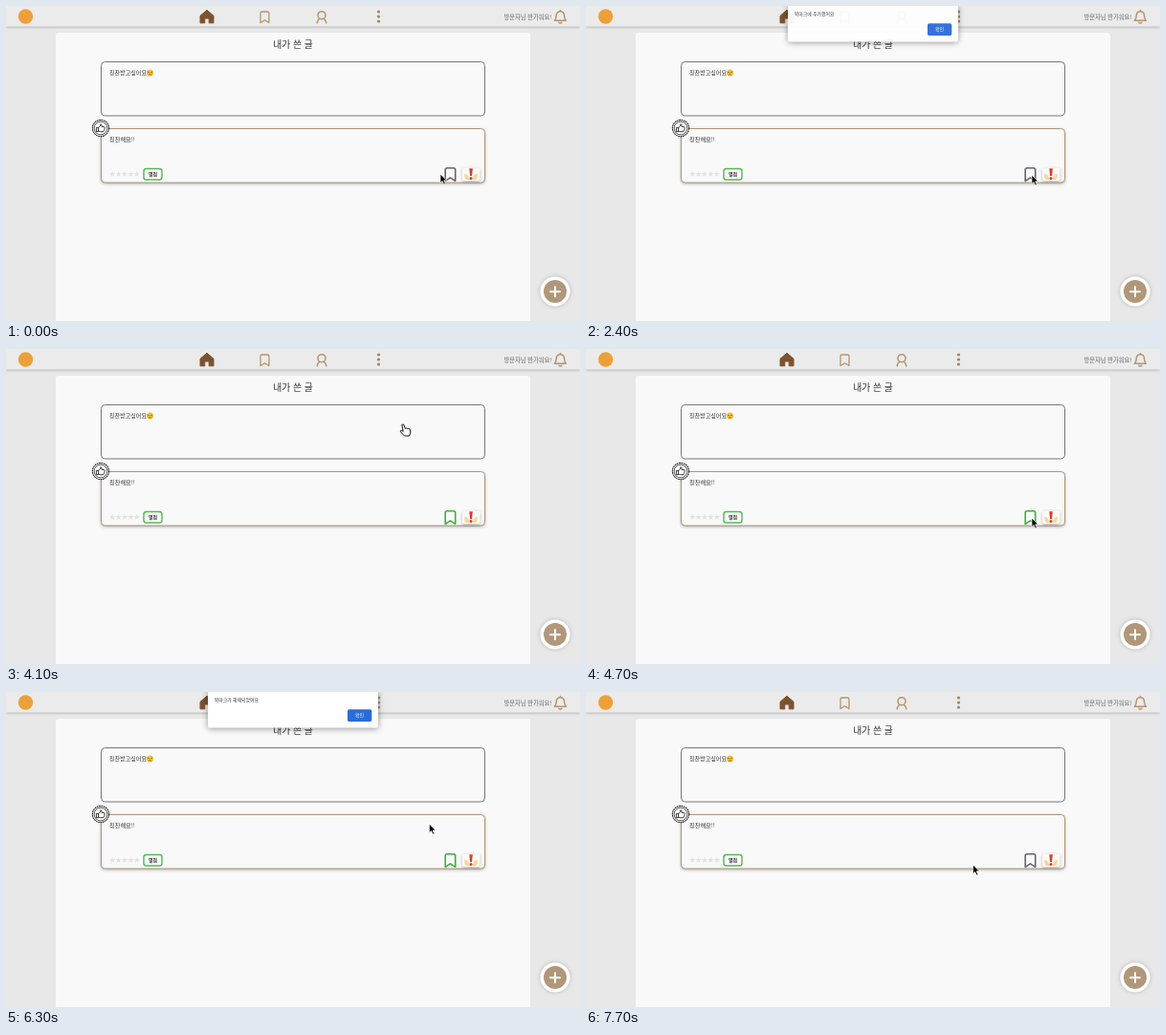
Animation, 600 px wide and 330 px high, one loop 7.8 s. Source, as an HTML page:

```html
<!DOCTYPE html>
<html lang="ko">
<head>
<meta charset="utf-8">
<style>
html, body { margin: 0; width: 100%; height: 100%; overflow: hidden; background: #e8e8e8; }
svg { display: block; width: 600px; height: 330px; }
text { font-family: "Noto Sans CJK KR", "Noto Sans CJK", "Noto Sans CJK JP", sans-serif; fill: #333; }
.line { fill: none; stroke-linecap: round; stroke-linejoin: round; }
.soft { filter: drop-shadow(0 1px 1.5px rgba(0,0,0,.28)); }
</style>
</head>
<body>
<svg viewBox="0 0 600 330">
  <defs>
    <path id="star" d="M0-3.2L.9-1 3.1-.9 1.4.5 2 2.7 0 1.5-2 2.7-1.4.5-3.1-.9-.9-1Z" fill="#e2e2e2"/>
    <path id="ribbon" d="M1.8 0H8.7Q10.5 0 10.5 1.8V13.6L5.25 10.2 0 13.6V1.8Q0 0 1.8 0Z"/>
  </defs>

  <rect width="600" height="330" fill="#e8e8e8"/>
  <rect x="52" y="28" width="496" height="310" rx="3" fill="#f9f9f9"/>

  <!-- Header -->
  <rect width="600" height="21.5" fill="#ebebeb" style="filter:drop-shadow(0 1px 1px rgba(0,0,0,.22))"/>
  <circle cx="20.5" cy="11" r="7.7" fill="#eda03a"/>
  <path d="M210 4.2L217 10.3V17.8H212.2V13H207.8V17.8H203V10.3Z" fill="#7c522f" stroke="#7c522f" stroke-linejoin="round"/>
  <g class="line" stroke="#b2956f" stroke-width="1.5">
    <use href="#ribbon" transform="translate(266 6) scale(.85)"/>
    <circle cx="330" cy="9.7" r="4"/>
    <path d="M325.2 17.8Q325.7 14.2 328 13.4M334.8 17.8Q334.3 14.2 332 13.4"/>
    <path d="M573.4 15.2H585.4Q583.6 13.3 583.6 10.5 583.6 6.2 579.4 5.5 575.2 6.2 575.2 10.5 575.2 13.3 573.4 15.2ZM579.4 5.4V4.4M577.9 17.4Q579.4 18.6 580.9 17.4"/>
  </g>
  <g fill="#a5825c">
    <circle cx="389.5" cy="6" r="1.6"/><circle cx="389.5" cy="11" r="1.6"/><circle cx="389.5" cy="16" r="1.6"/>
  </g>
  <text x="520.5" y="13.7" font-size="6.25" style="fill:#666">방문자님 반가워요!</text>

  <text x="300" y="44" font-size="9.8" text-anchor="middle">내가 쓴 글</text>

  <!-- First card -->
  <rect x="99.5" y="58.5" width="401" height="56.5" rx="4" fill="#f9f9f9" stroke="#77757a"/>
  <text x="108" y="72.3" font-size="6.05">칭찬받고싶어요</text>
  <circle cx="150.5" cy="70" r="3.6" fill="#f5bf3d"/>
  <path class="line" d="M148.4 69.2L149.6 69.6M151.4 69.6L152.6 69.2M149.3 72Q150.5 70.9 151.7 72" stroke="#7a4a1c" stroke-width=".7"/>

  <!-- Second card -->
  <rect class="soft" x="99.5" y="128.5" width="401" height="56.5" rx="4" fill="#f9f9f9" stroke="#ae9479"/>
  <text x="108" y="142.3" font-size="6.2">칭찬해요!!</text>
  <g id="stars"></g>
  <rect x="144" y="170.5" width="19" height="11.5" rx="2.6" fill="#fff" stroke="#4fba50" stroke-width="1.4"/>
  <text x="153.5" y="178" font-size="5" font-weight="700" text-anchor="middle">별점</text>
  <circle cx="99" cy="128" r="9" fill="#fff"/>
  <circle cx="99" cy="128" r="8.6" fill="none" stroke="#222" stroke-width="1.1" stroke-dasharray="1.8 .6"/>
  <circle cx="99" cy="128" r="6.9" fill="#fff" stroke="#222" stroke-width=".8"/>
  <path class="line" d="M94.8 127.4H96.6V131.6H94.8ZM96.6 127.6L98.5 125.8 98.9 123.7Q100.4 123.6 100.2 126.5H102.5Q103.6 126.8 103 128.2 103.3 129.3 102.5 130.2 102.3 131.6 101.2 131.7H98.3L96.6 131.1" stroke="#222" stroke-width=".9"/>
  <use id="mark" href="#ribbon" class="line" x="459.2" y="169.7" stroke-width="1.6"/>
  <rect class="soft" x="477" y="169.5" width="18.5" height="13.6" rx="2" fill="#fafafa"/>
  <path d="M479.2 176Q481.5 174.8 483.4 178.5L484.3 182H480.6Q478.6 179 479.2 176ZM492.8 176Q490.5 174.8 488.6 178.5L487.7 182H491.4Q493.4 179 492.8 176Z" fill="#f7d79a"/>
  <path d="M484.3 170.3H487.8L487 178H485.1Z" fill="#dc3b27"/>
  <circle cx="486" cy="180.6" r="1.5" fill="#dc3b27"/>

  <!-- Add button -->
  <circle cx="574" cy="299" r="15.6" fill="#fff" style="filter:drop-shadow(0 0 2px rgba(0,0,0,.22))"/>
  <circle cx="574" cy="299" r="12" fill="#b1977a"/>
  <path class="line" d="M569 299.3H579M574 294.3V304.3" stroke="#fff" stroke-width="2"/>

  <g id="dialog">
    <path d="M211 -2H389V35.5Q389 37.5 387 37.5H213Q211 37.5 211 35.5Z" fill="#fff" style="filter:drop-shadow(0 1px 3px rgba(0,0,0,.4))"/>
    <text id="message" x="217.7" y="9.8" font-size="4.88"></text>
    <rect x="357" y="18.3" width="25.3" height="12.6" rx="1.6" fill="#2a6cd6"/>
    <text x="369.6" y="26.4" font-size="4.9" text-anchor="middle" style="fill:#fff">확인</text>
  </g>

  <path id="arrow" d="M0 0V9.4L2.1 7.4 3.7 11 5.3 10.3 3.7 6.8H6.7Z" fill="#000" stroke="#fff" stroke-width=".7"/>
  <path id="hand" d="M-1.2 .6Q0-.8 1.1.6L2.3 4.4Q3.4 3.6 4.2 4.4 5.2 3.7 6 4.6 7.3 4.3 7.6 5.8L7.7 9.2 6.6 12H1.5L-2.6 7.8Q-3 6 -1.3 6.4L.2 7.3Z" fill="#fff" stroke="#111" stroke-width="1" stroke-linejoin="round"/>
</svg>
<script>
const $ = id => document.getElementById(id);
const LOOP = 7800, STEP = 100;
const smooth = u => u * u * (3 - 2 * u);
const easeIn = u => u ** 1.4;
const easeOut = u => 1 - (1 - u) ** 1.8;

// Pointer stops: time, x, y, easing used to arrive there
const stops = [
  [0, 454, 176], [300, 459, 177, smooth], [500, 459, 177, smooth], [700, 466, 177, smooth],
  [2600, 466, 177, smooth], [3300, 375, 27, smooth], [3700, 375, 27, smooth],
  [4100, 415, 79, easeIn], [4700, 466, 177, easeOut], [6100, 466, 177, smooth],
  [6700, 375, 27, smooth], [7200, 375, 27, smooth], [7700, 404.5, 181, smooth]
];
const dialogs = [
  { open: 2400, close: 3700, text: "북마크에 추가했어요" },
  { open: 5900, close: 7200, text: "북마크가 해제되었어요" }
];

$("stars").innerHTML = [0, 1, 2, 3, 4]
  .map(i => `<use href="#star" x="${111.2 + i * 6.4}" y="176"/>`).join("");

function pointer(t) {
  const i = stops.findIndex(s => s[0] > t);
  if (i < 0) return stops.at(-1).slice(1, 3);
  const a = stops[i - 1], b = stops[i];
  const u = b[3]((t - a[0]) / (b[0] - a[0]));
  return [a[1] + (b[1] - a[1]) * u, a[2] + (b[2] - a[2]) * u];
}

const show = (el, on) => el.setAttribute("visibility", on ? "visible" : "hidden");

function draw(time) {
  const t = Math.floor((time % LOOP) / STEP) * STEP;
  const active = dialogs.find(d => t >= d.open && t < d.close);
  show($("dialog"), active);
  if (active) {
    $("message").textContent = active.text;
    $("dialog").setAttribute("opacity", t === active.open ? 0.94 : 1);
  }

  const saved = t >= dialogs[0].close && t < dialogs[1].close;
  $("mark").setAttribute("stroke", saved ? "#35b535" : "#66636a");

  const [x, y] = pointer(t);
  const overCard = !active && x > 99 && x < 501 && y > 58 && y < 115;
  for (const id of ["arrow", "hand"]) {
    $(id).setAttribute("transform", `translate(${x} ${y})`);
    show($(id), (id === "hand") === overCard);
  }
}

const start = performance.now();
function tick() {
  draw(performance.now() - start);
  requestAnimationFrame(tick);
}
tick();
</script>
</body>
</html>
```
